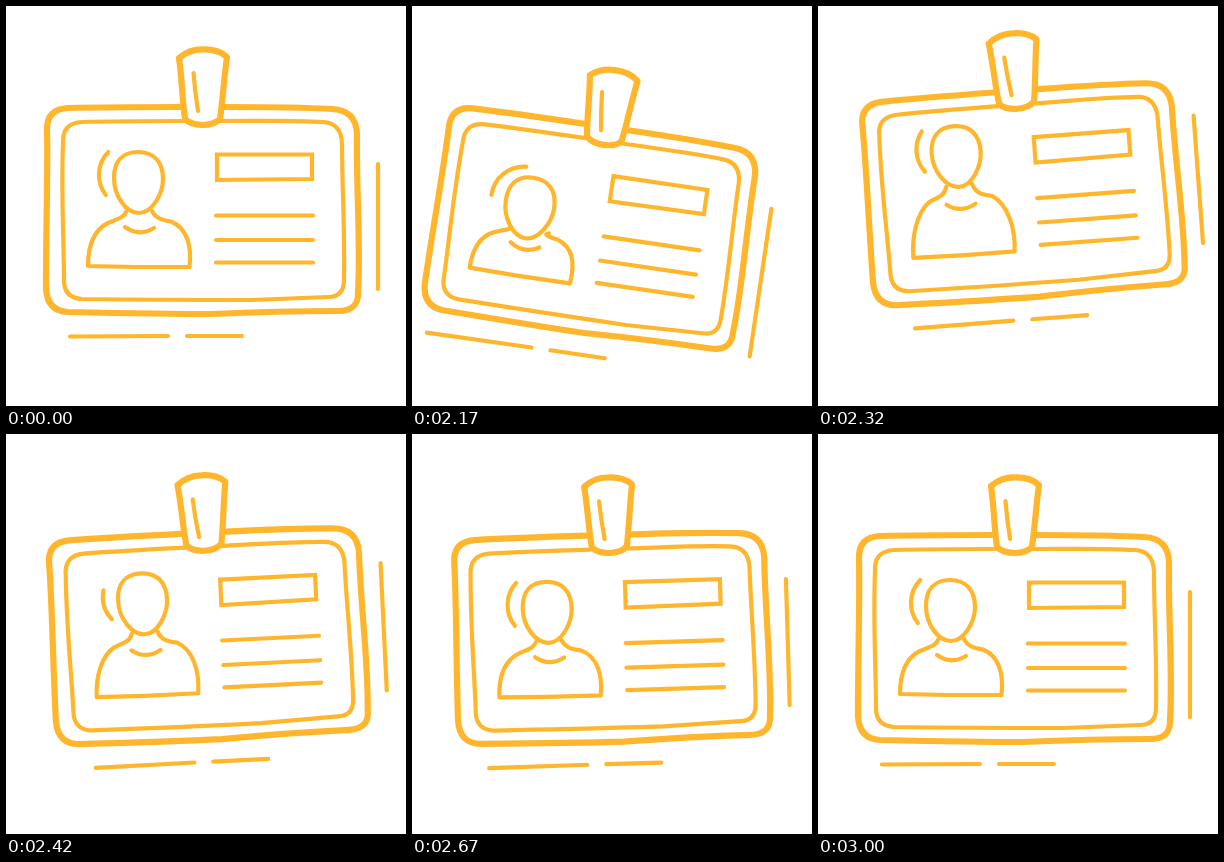
An HTML page for the animation above (3.02 s loop, 400 by 400 pixels).

```html
<!DOCTYPE html>
<html lang="en">
<head>
<meta charset="utf-8">
<title>Swinging badge</title>
<style>
  html, body { margin: 0; width: 100%; height: 100%; overflow: hidden; background: #fff; }
  svg { display: block; width: 100vw; height: 100vh; }
  path { fill: none; stroke: #ffb62c; stroke-width: 4.2; stroke-linecap: round; stroke-linejoin: round; }
  .bold { stroke-width: 6.2; }
</style>
</head>
<body>
<svg viewBox="0 0 400 400">
  <g id="badge">
    <path class="bold" d="M174 101C140 101 100 101 62 102Q40 103 41 125C42 160 40 220 40 282Q41 305 62 306C110 307 160 308 205 308C250 306 290 305 332 305Q353 305 352 286C355 240 350 180 351 128Q350 104 326 103C290 101 250 101 219 101"/>
    <path d="M178 115C145 115 110 115 76 116Q56 117 57 137C55 190 58 235 58 276Q59 292 76 293C150 294 200 294 245 294L322 291Q338 291 338 274C339 225 336 180 336 137Q335 117 317 116C285 114 250 115 215 115"/>
    <path class="bold" d="M173 52Q184 43 197 43.500Q212 43 221 51C218 72 217 92 214 113Q208 119 197 119Q185 119 179 113C176 92 176 72 173 52Z"/>
    <path d="M187.500 67Q189 86 192 105"/>
    <path style="stroke-linejoin:miter" d="M211 148.500H306V173L211 174Z"/>
    <path d="M210 209.500H307M210 234H307M210 256.500H307"/>
    <path id="body"/>
    <path id="collar" d="M119 221Q133 231 148 222"/>
    <g id="head">
      <path d="M132 146C148 146 157 156 157 173C157 188 146 207 133 207C120 207 108 190 108 172C108 156 116 146 132 146Z"/>
      <path id="arc"/>
    </g>
    <path id="side"/>
    <path id="under"/>
  </g>
</svg>
<script>
const LOOP = 3020, START = 2020, STEP = 25;
const RISE = 1980, PEAK = 2178, BEAT = 177, END = 3000;

// Sine ease from a at t0 to b at t1.
function ease(t, t0, t1, a, b) {
  const p = Math.min(1, Math.max(0, (t - t0) / (t1 - t0)));
  return a + (b - a) * (1 - Math.cos(Math.PI * p)) / 2;
}

// Damped swing: every turning point is a fixed share of the one before.
function swing(t) {
  const turn = i => 8.4 * (-0.66) ** i;
  if (t < PEAK) return ease(t, RISE, PEAK, 0, turn(0));
  const i = Math.floor((t - PEAK) / BEAT), from = PEAK + i * BEAT, to = from + BEAT;
  return ease(t, from, Math.min(to, END), turn(i), to < END ? turn(i + 1) : 0);
}

// One move to a high value, one to a low value, then back to rest.
function bounce(t, highAt, high, lowAt, low, restAt) {
  if (t < highAt) return ease(t, RISE, highAt, 0, high);
  if (t < lowAt) return ease(t, highAt, lowAt, high, low);
  return ease(t, lowAt, restAt, low, 0);
}

// Scales a value by its sign.
const pull = (v, plus, minus) => v * (v > 0 ? plus : minus);

// Point on the circle around the head; 0 degrees is left, positive goes up.
function rim(deg) {
  const r = deg * Math.PI / 180;
  return `${126 - 33 * Math.cos(r)} ${169 - 33 * Math.sin(r)}`;
}

// Shoulders and neck stretch as the head lifts and sink as it drops.
function bodyPath(head) {
  const s = pull(head, 0.25, 0.8), neck = pull(head, 0.6, 1), wide = Math.max(0, head);
  return `M${120 - wide * 0.3} ${206 + neck}C118 ${212 + s} 111 ${213 + s} 102 ${217 + s}` +
    `C88 ${224 + s * 0.7} 82 240 82 260L130 261H183.500` +
    `C186 240 181 ${222 + s * 0.7} 165 ${215.5 + s}` +
    `C156 ${214 + s} 149 ${212 + s} ${146 + wide * 0.6} ${205 + neck}`;
}

function set(id, attr, text) {
  document.getElementById(id).setAttribute(attr, text);
}

function draw(t) {
  const drop = bounce(t, 2205, 21.5, 2325, -16.3, 2450);
  const head = bounce(t, 2185, 16, 2325, -14.5, 2520);
  const spin = bounce(t, 2195, 43, 2400, -31, 2600);
  const lag = swing(t - 8);
  const shift = pull(lag, -0.85, -4.2);

  set('badge', 'transform', `translate(0 ${drop}) rotate(${swing(t)} 197 84)`);
  set('head', 'transform', `translate(0 ${head})`);
  set('collar', 'transform', `translate(0 ${pull(head, 0.5, 0.8)})`);
  set('body', 'd', bodyPath(head));
  set('arc', 'd', `M${rim(44 + spin)}A33 33 0 0 0 ${rim(pull(spin, 0.9, 0.1) - 37.5)}`);
  set('side', 'd', `M372 ${158 + pull(lag, 0, 5.3)}V${283 + pull(lag, 2.9, 4.6)}`);
  set('under', 'd', `M${64 + pull(lag, -1.8, -4)} 330.5L${162 + shift} 330M${181 + shift} 330h55`);
}

// The badge rests first, then swings in steps of 25 ms.
function tick() {
  const t = performance.now() % LOOP;
  draw(t < START ? 0 : START + Math.floor((t - START) / STEP) * STEP);
  requestAnimationFrame(tick);
}
tick();
</script>
</body>
</html>
```
